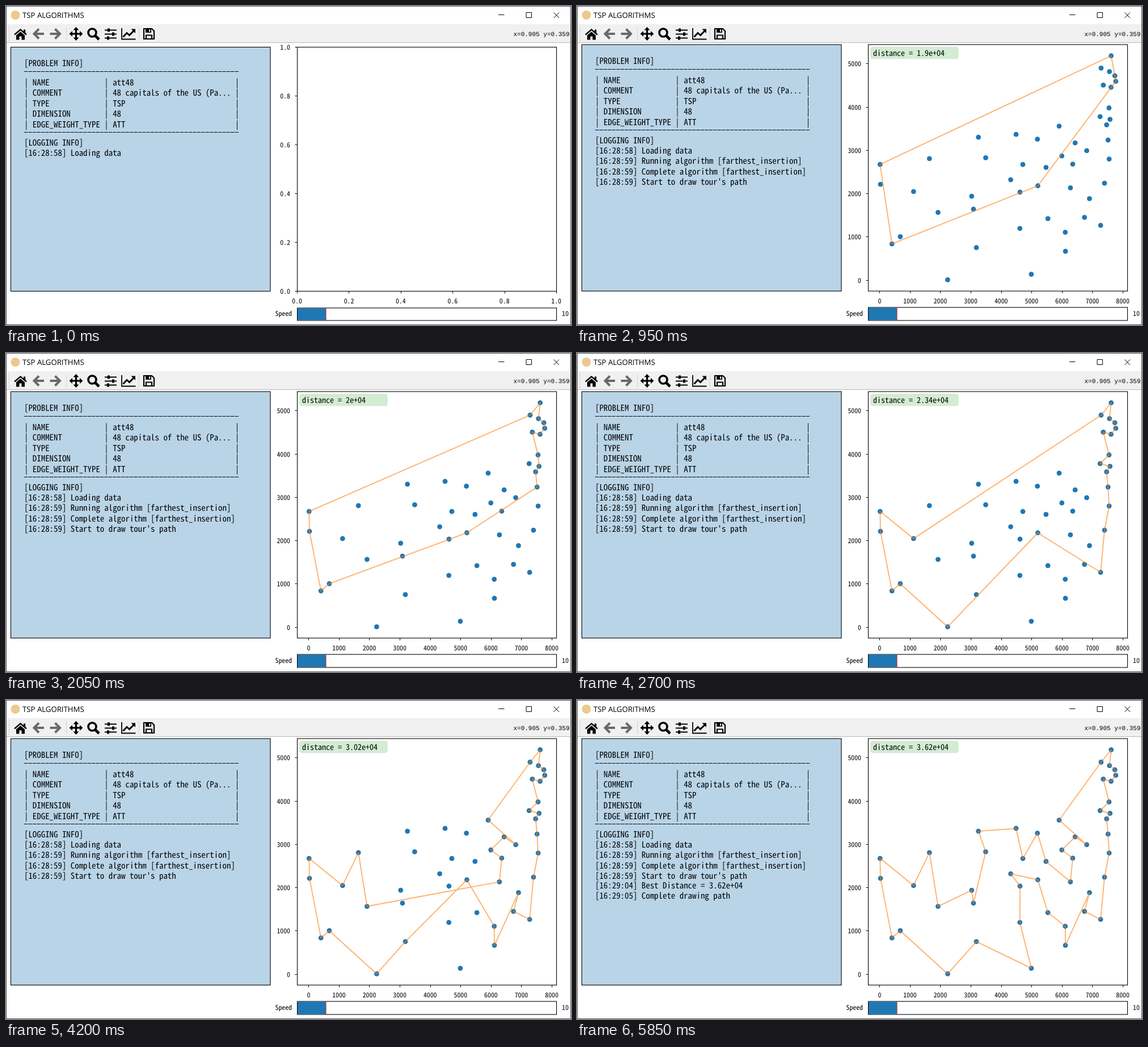
These frames come from a looping animation (996x562 px, 6150 ms). An HTML page:

```html
<!DOCTYPE html>
<html lang="en">
<head>
<meta charset="utf-8">
<title>TSP ALGORITHMS</title>
<style>
html, body { margin: 0; width: 100%; height: 100%; overflow: hidden; background: #fff; }
svg { display: block; width: 996px; height: 562px; }
text { font-family: "Noto Sans Mono CJK SC", "Noto Sans CJK SC", "Liberation Mono", monospace; text-rendering: geometricPrecision; white-space: pre; }
.log { font-size: 14.88px; }
.tick { font-size: 11.8px; }
.box { stroke: #000; stroke-width: 1.1; }
.line { fill: none; stroke: #000; }
.off { display: none; }
</style>
</head>
<body>
<svg viewBox="0 0 996 562" xmlns="http://www.w3.org/2000/svg">
  <rect width="996" height="562" fill="#fff"/>
  <rect y="32" width="996" height="32" fill="#f0f0f0"/>
  <path d="M0 64.5H996" stroke="#b8b8b8"/>
  <circle cx="16.5" cy="16" r="8" fill="#ecc98f"/>
  <text x="29" y="21" style="font:13.2px 'Open Sans',sans-serif">TSP ALGORITHMS</text>
  <path class="line" d="M868 15.5H878.5M917 11.5H926.5V20.5H917ZM965.5 11.5L975 21M975 11.5L965.5 21"/>
  <path d="M5.5 36V62" stroke="#aaa" stroke-dasharray="1 2"/>
  <path d="M106.5 37V60M234.5 37V60" stroke="#d4d4d4"/>

  <g id="icons">
    <path d="M31 41.5h3.2v6h-3.2zM18 51.5L25.5 45.2L33 51.5V59.5H27.5V53.5H23.5V59.5H18Z"/>
    <path class="line" stroke-width="2.4" d="M15 50.5L25.5 41.5L36 50.5"/>
    <g class="line" style="stroke:#696969" stroke-width="4">
      <path d="M49.5 49H67M58 40.5L49.5 49L58 57.5"/>
      <path d="M95 49H77.5M86.5 40.5L95 49L86.5 57.5"/>
    </g>
    <path class="line" stroke-width="3.2" d="M115 49H132M123.5 41V57"/>
    <path d="M111.5 49l5.5-5v10zM135.5 49l-5.5-5v10zM123.5 37l-5 5.5h10zM123.5 61l-5-5.5h10z"/>
    <circle class="line" cx="152" cy="47" r="7" stroke-width="3.6"/>
    <path class="line" stroke-width="4.6" d="M157 52L164 59"/>
    <path class="line" stroke-width="2.2" d="M174 42.5H195M174 49.5H195M174 56.5H195"/>
    <path class="line" stroke-width="4" d="M181 39.5v6M189 46.5v6M180 53.5v6"/>
    <path class="line" stroke-width="1.8" d="M204 39V58.5H228.5"/>
    <path class="line" stroke-width="3" d="M206.5 54.5L213 47.5L217.5 51.5L225 44"/>
    <path d="M220.5 40.5H228V48Z"/>
    <path class="line" stroke-width="2.2" d="M243 40H257L261 44V58H243ZM247 58V51.5H257V58"/>
    <path d="M246 40h10v7h-10z"/>
    <path d="M252 41.5h2.2v4h-2.2z" fill="#f0f0f0"/>
  </g>
  <text x="993.5" y="53" text-anchor="end" style="font:11px 'Liberation Mono',monospace">x=0.905 y=0.359</text>

  <rect id="panel" class="box" x="8.5" width="457.5" fill="#b9d4e7"/>
  <g id="info"></g>

  <g id="empty"></g>
  <g id="plot">
    <g id="dots" fill="#1f77b4"></g>
    <polygon id="tour" fill="none" stroke="#ff7f0e" stroke-opacity=".6" stroke-width="1.9" stroke-linejoin="round"/>
  </g>
  <g id="label">
    <rect x="518" y="72.2" width="154" height="20.6" rx="3.5" fill="#d3ecd3" stroke="#cce8cc"/>
    <text id="dist" x="522" y="87.5" font-size="14"></text>
  </g>

  <rect id="slider" class="box" x="513.5" width="457" fill="#fff"/>
  <rect id="level" x="514" width="50" fill="#1f77b4"/>
  <path d="M564.2 532V554" stroke="#f00" stroke-opacity=".75"/>
  <text class="tick" x="504" y="546" text-anchor="end">Speed</text>
  <text class="tick" x="980" y="546">10</text>
  <rect x=".5" y=".5" width="995" height="561" fill="none" stroke="#555"/>
</svg>
<script>
const LOOP = 6150;
const cities = [
  6734,1453, 2233,10, 5530,1424, 401,841, 3082,1644, 7608,4458, 7573,3716, 7265,1268,
  6898,1885, 1112,2049, 5468,2606, 5989,2873, 4706,2674, 4612,2035, 6347,2683, 6107,669,
  7611,5184, 7462,3590, 7732,4723, 5900,3561, 4483,3369, 6101,1110, 5199,2182, 1633,2809,
  4307,2322, 675,1006, 7555,4819, 7541,3981, 3177,756, 7352,4506, 7545,2801, 3245,3305,
  6426,3173, 4608,1198, 23,2216, 7248,3779, 7762,4595, 7392,2244, 3484,2829, 6271,2135,
  4985,140, 1916,1569, 7280,4899, 7509,3239, 10,2676, 6807,2993, 5185,3258, 3023,1942
].reduce((list, v, i, all) => (i % 2 ? list.push([all[i - 1], v]) : 0, list), []);

const $ = id => document.getElementById(id);
const add = (parent, name, attrs, text = '') => {
  const el = document.createElementNS('http://www.w3.org/2000/svg', name);
  for (const k in attrs) el.setAttribute(k, attrs[k]);
  el.textContent = text;
  return parent.appendChild(el);
};
const show = (el, on) => el.classList.toggle('off', !on);
const gap = (a, b) => Math.hypot(a[0] - b[0], a[1] - b[1]);

// Farthest insertion: take the city farthest from any visited one, put it where it costs least.
function buildTours() {
  let tour = [cities[22]];
  const tours = [[], tour];
  const left = new Set(cities);
  left.delete(tour[0]);
  while (left.size) {
    let next, far = -1;
    for (const c of left) {
      const d = Math.max(...tour.map(v => gap(c, v)));
      if (d > far) { far = d; next = c; }
    }
    const cost = tour.map((a, i) => {
      const b = tour[(i + 1) % tour.length];
      return gap(a, next) + gap(next, b) - gap(a, b);
    });
    const at = cost.indexOf(Math.min(...cost)) + 1;
    tour = [...tour.slice(0, at), next, ...tour.slice(at)];
    left.delete(next);
    tours.push(tour);
  }
  return tours;
}
const tours = buildTours();
const tourLength = t => t.reduce((sum, c, i) => sum + gap(c, t[(i + 1) % t.length]), 0);
const short = v => Number((v / 1e4).toPrecision(3)) + 'e+04';

// Redraw times; at some of them two cities appear at once.
const redraws = Array.from({ length: 24 }, (_, k) => 700 + 250 * (k >> 1) + 100 * (k % 2))
  .concat(3700, 3850, 3950, 4050, 4200, 4350, 4450, 4550, 4700, 4800, 4950, 5100, 5200, 5350, 5450, 5550);
const doubles = [950, 1950, 2700, 3700, 4950, 5350];
const passed = (times, t) => times.filter(v => v <= t).length;

// Axes
const TOP = 68, BOTTOM = 502.2;
const X = v => 513.5 + (v + 377.6) * 457 / 8527.2;
const Y = v => BOTTOM - (v + 248.7) * (BOTTOM - TOP) / 5691.4;
function axes(group, top, bottom, xTicks, yTicks) {
  add(group, 'rect', { class: 'box', x: 513.5, y: top, width: 457, height: bottom - top, fill: 'none' });
  const snap = v => Math.floor(v) + .5;
  for (const [pos, name] of xTicks) {
    add(group, 'path', { class: 'line', d: `M${snap(pos)} ${bottom}v4` });
    add(group, 'text', { class: 'tick', x: pos - .4, y: 524, 'text-anchor': 'middle' }, name);
  }
  for (const [pos, name] of yTicks) {
    add(group, 'path', { class: 'line', d: `M513.5 ${snap(pos)}h-4` });
    add(group, 'text', { class: 'tick', x: 501, y: pos + 4.5, 'text-anchor': 'end' }, name);
  }
}
const ticks = (n, pos, name) => Array.from({ length: n }, (_, i) => [pos(i), name(i)]);
const unit = i => (i / 5).toFixed(1);
axes($('empty'), 72.5, 502.5,
  ticks(6, i => 513.5 + i * 91.4, unit), ticks(6, i => 502.5 - i * 86, unit));
axes($('plot'), TOP, BOTTOM,
  ticks(9, i => X(i * 1000), i => i * 1000), ticks(6, i => Y(i * 1000), i => i * 1000));
for (const [x, y] of cities) add($('dots'), 'circle', { cx: X(x), cy: Y(y), r: 4.4 });

// Text panel
const write = (y, s) => add($('info'), 'text', { class: 'log', x: 32, y }, s);
const rule = y => add($('info'), 'path', { class: 'line', d: `M32 ${y}H411`, 'stroke-dasharray': '6.4 1.03' });
write(102, '[PROBLEM INFO]');
rule(111.5);
[['NAME', 'att48'], ['COMMENT', '48 capitals of the US (Pa...'], ['TYPE', 'TSP'],
 ['DIMENSION', '48'], ['EDGE_WEIGHT_TYPE', 'ATT']].forEach(([key, value], i) =>
  write(135.5 + i * 18.6, `| ${key.padEnd(16)} | ${value.padEnd(28)} |`));
rule(218.5);
write(242, '[LOGGING INFO]');
const log = [
  [0, 260, '[16:28:58] Loading data'],
  [250, 277.5, '[16:28:59] Running algorithm [farthest_insertion]'],
  [400, 296.5, '[16:28:59] Complete algorithm [farthest_insertion]'],
  [500, 314.5, "[16:28:59] Start to draw tour's path"],
  [5850, 332, `[16:29:04] Best Distance = ${short(tourLength(tours[48]))}`],
  [5850, 349.5, '[16:29:05] Complete drawing path']
].map(([from, y, s]) => ({ from, el: write(y, s) }));

function place(el, top, bottom) {
  el.setAttribute('y', top);
  el.setAttribute('height', bottom - top);
}

function frame() {
  const t = performance.now() % LOOP;
  const loaded = t >= 100;
  const steps = passed(redraws, t);
  const tour = steps ? tours[2 + steps + passed(doubles, t)] : [];

  show($('empty'), !loaded);
  show($('plot'), loaded);
  show($('label'), steps);
  $('info').setAttribute('transform', `translate(0 ${loaded ? 0 : 4})`);
  place($('panel'), loaded ? TOP : 72.5, loaded ? BOTTOM : 502.5);
  place($('slider'), loaded ? 531 : 532, 554);
  place($('level'), loaded ? 531.5 : 532.5, 553.5);
  for (const { from, el } of log) show(el, t >= from);

  $('tour').setAttribute('points', tour.map(([x, y]) => `${X(x)},${Y(y)}`).join(' '));
  if (steps) $('dist').textContent = 'distance = ' + short(tourLength(tour));
  requestAnimationFrame(frame);
}
frame();
</script>
</body>
</html>
```
